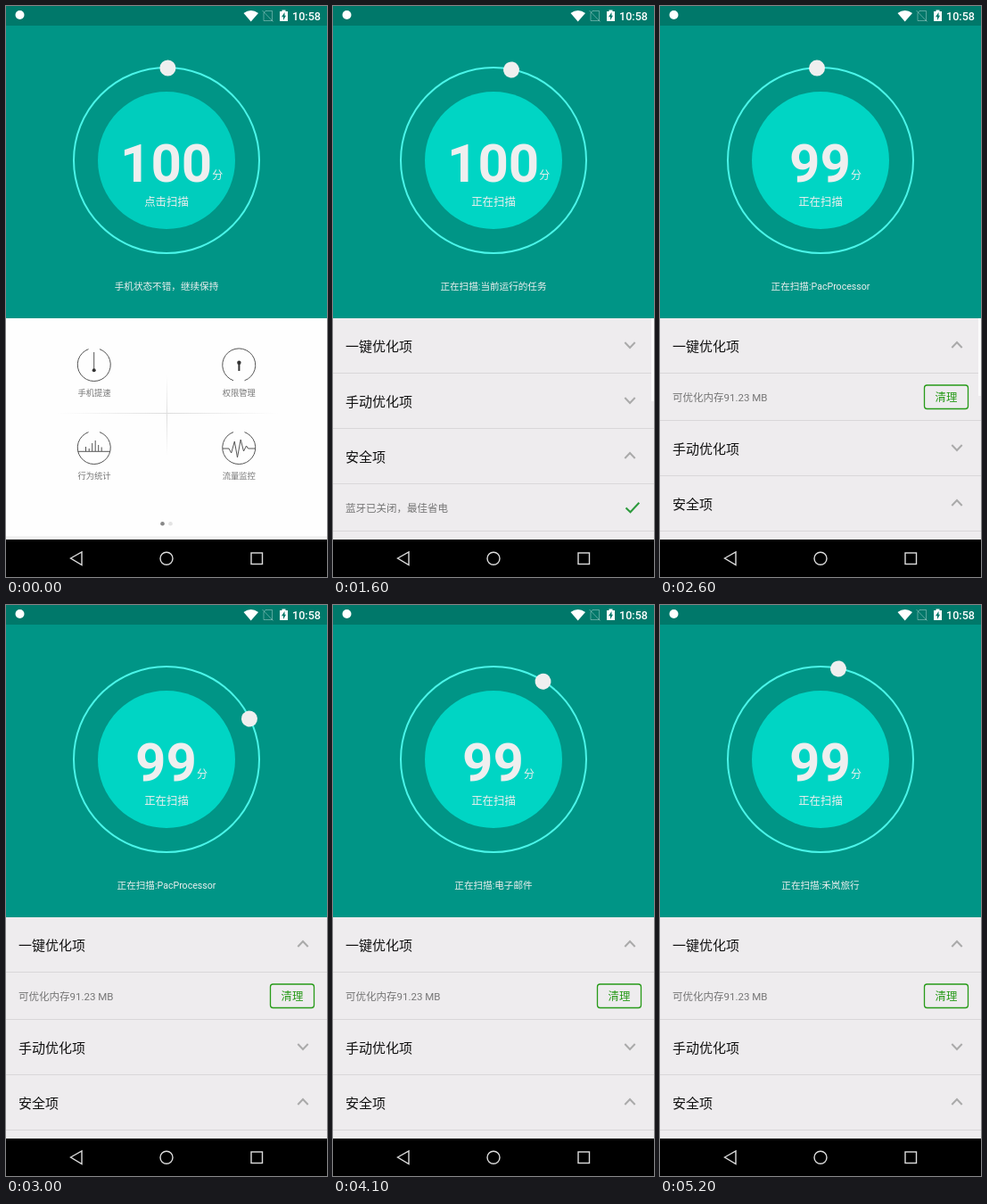
An HTML page for the animation above (5.3 s loop, 360 px wide and 640 px high).

```html
<!DOCTYPE html>
<html lang="zh-CN">
<head>
<meta charset="utf-8">
<style>
  html, body { margin: 0; width: 100%; height: 100%; overflow: hidden; background: #000; }
  svg { display: block; width: 360px; height: 640px; font-family: Roboto, "Noto Sans CJK SC", "Noto Sans CJK", sans-serif; }
  .mid { text-anchor: middle; }
  .line { fill: none; stroke: #555; stroke-width: 1; }
  .label { font-size: 9.3px; fill: #777; text-anchor: middle; }
  .title { font-size: 15px; fill: #111; }
  .item { font-size: 11.5px; fill: #757575; }
  .chevron { fill: none; stroke: #aaa; stroke-width: 2; }
</style>
</head>
<body>
<svg viewBox="0 0 360 640">
  <defs>
    <linearGradient id="fadeX"><stop stop-color="#ddd" stop-opacity="0"/><stop offset=".5" stop-color="#ddd"/><stop offset="1" stop-color="#ddd" stop-opacity="0"/></linearGradient>
    <linearGradient id="fadeY" href="#fadeX" x2="0" y2="1"/>
  </defs>

  <rect width="360" height="350" fill="#009586"/>
  <rect width="360" height="22" fill="#00786a"/>
  <g fill="#fff">
    <circle cx="15.5" cy="10" r="5"/>
    <path d="M266.5 8Q274.7 2 283 8L274.7 17.5Z"/>
    <path d="M291 5.5H298.5V16.5H289V8ZM287.5 5L299.5 17.5" fill="none" stroke="#fff" stroke-opacity=".35"/>
    <path d="M309.5 4.5H313.5V6H316V17H307V6H309.5Z"/>
    <path d="M312.5 7L309 12.3H311V16L314 10.7H312.5Z" fill="#00786a"/>
    <text x="353" y="16" font-size="12.6" font-weight="500" text-anchor="end">10:58</text>
  </g>

  <circle id="disc" cx="180" cy="173" r="77"/>
  <circle cx="180" cy="173" r="104" fill="none" stroke="#4af5e9" stroke-width="2"/>
  <circle id="ball" cx="180" cy="69.5" r="9" fill="#efefef"/>
  <g fill="#efefef">
    <text id="score" y="196.5" font-size="60" font-weight="700"></text>
    <text id="unit" y="194" font-size="12">分</text>
    <text id="action" class="mid" x="180" y="224" font-size="12.4"></text>
    <text id="status" class="mid" x="180" y="318" font-size="10.6"></text>
  </g>

  <g id="menu">
    <rect y="350" width="360" height="248" fill="#fefefe"/>
    <rect y="594" width="360" height="4" fill="#f3f3f3"/>
    <rect x="58" y="456" width="248" height="1" fill="url(#fadeX)"/>
    <rect x="180" y="414" width="1" height="90" fill="url(#fadeY)"/>
    <g class="line">
      <path id="dial" d="M92.5 384.6A18.5 18.5 0 1 0 105 384.6"/>
      <path d="M98.7 388V408"/>
      <path d="M255 419.8A18.5 18.5 0 1 1 267.5 419.8"/>
      <use href="#dial" y="93"/>
      <path d="M80.5 499.3H117M89.5 499V494M93.2 499V496M96.7 499V490M100.2 499V487M103.7 499V492M107.2 499V494.5"/>
      <use href="#dial" x="162.5" y="93"/>
      <path d="M243 496H250L252.7 501L256.3 488L259.5 506L263.2 486L266.5 499L269.5 493L271.5 496H280"/>
    </g>
    <circle cx="98.7" cy="408.3" r="2" fill="#333"/>
    <path d="M261.4 400V409" stroke="#333" stroke-width="2"/>
    <circle cx="261.4" cy="399.7" r="2.2" fill="#333"/>
    <g class="label">
      <text x="99" y="437">手机提速</text><text x="261.3" y="437">权限管理</text>
      <text x="99" y="530">行为统计</text><text x="261.3" y="530">流量监控</text>
    </g>
    <circle cx="175.5" cy="580.3" r="2.3" fill="#888"/>
    <circle cx="184.5" cy="580.3" r="2.3" fill="#e3e3e3"/>
  </g>

  <g id="list">
    <rect y="350" width="360" height="248" fill="#eeecee"/>
    <g id="firstRows"></g>
    <g id="laterRows"></g>
    <rect id="scrollbar" x="357" y="350" width="3" fill="#fbfbfb"/>
  </g>

  <rect y="598" width="360" height="42"/>
  <g fill="none" stroke="#ddd" stroke-width="1.4">
    <path d="M72.5 619L85 612V626.5Z"/>
    <circle cx="180" cy="619.3" r="7"/>
    <rect x="275" y="613" width="12.5" height="12.5"/>
  </g>
</svg>
<script>
const LOOP = 5300, STEP = 100, TURN = 1200;
const START = 1300, LIST = 1500, SPIN = 1470, FOUND = 2300;
const STATUS = [
  [0, "手机状态不错，继续保持"],
  [LIST, "正在扫描:当前运行的任务"],
  [FOUND, "正在扫描:PacProcessor"],
  [3100, "正在扫描:青荷匣"],
  [3800, "正在扫描:电子邮件"],
  [4700, "正在扫描:禾岚旅行"]
];
const $ = id => document.getElementById(id);
const attr = (id, values) => Object.entries(values).forEach(([k, v]) => $(id).setAttribute(k, v));

const divider = y => `<path d="M0 ${y - .5}H360" stroke="#d9d7d9"/>`;

function group(top, title, open) {
  const mid = top + 30, dy = open ? -3 : 3;
  return `<text class="title" x="14" y="${top + 36.5}">${title}</text>
    <path class="chevron" d="M327.3 ${mid - dy}L333 ${mid + dy}L338.7 ${mid - dy}"/>${divider(top + 62)}`;
}

function item(top, text, extra) {
  return `<text class="item" x="14" y="${top + 31}">${text}</text>
    <g transform="translate(0 ${top})">${extra}</g>${divider(top + 53)}`;
}

const check = '<path d="M328.5 26.5L333.5 31.3L343.3 20.7" fill="none" stroke="#2c9a3c" stroke-width="2"/>';
const button = `<rect x="296.5" y="13" width="49" height="26.5" rx="3" fill="none" stroke="#279a18" stroke-width="1.3"/>
  <text class="mid" x="321" y="31" font-size="12.4" fill="#279a18">清理</text>`;

$("firstRows").innerHTML = group(350, "一键优化项") + group(412, "手动优化项") +
  group(474, "安全项", true) + item(536, "蓝牙已关闭，最佳省电", check);
$("laterRows").innerHTML = group(350, "一键优化项", true) + item(412, "可优化内存91.23 MB", button) +
  group(465, "手动优化项") + group(527, "安全项", true);

function draw(t) {
  const scanning = t >= START, listed = t >= LIST, found = t >= FOUND;
  const phase = Math.max(0, t - SPIN) % TURN / TURN;
  const angle = .8 + 180 * (1 - Math.cos(Math.PI * phase));
  const show = (id, on) => attr(id, { display: on ? "inline" : "none" });

  attr("ball", { transform: `rotate(${angle} 180 173)` });
  attr("disc", { fill: scanning ? "#00d5c4" : "#00cdbd" });
  attr("score", { x: found ? 145 : 128 });
  attr("unit", { x: found ? 214 : 231.3 });
  $("score").textContent = found ? 99 : 100;
  $("action").textContent = scanning ? "正在扫描" : "点击扫描";
  $("status").textContent = STATUS.filter(([from]) => t >= from).pop()[1];

  show("menu", !listed);
  show("list", listed);
  show("firstRows", !found);
  show("laterRows", found);
  attr("scrollbar", { height: found ? 87 : 93, opacity: Math.min(1, Math.max(0, (2900 - t) / 300)) });
}

// The screen refreshes in steps of a tenth of a second.
function tick() {
  draw(Math.floor(performance.now() % LOOP / STEP) * STEP);
  requestAnimationFrame(tick);
}
tick();
</script>
</body>
</html>
```
